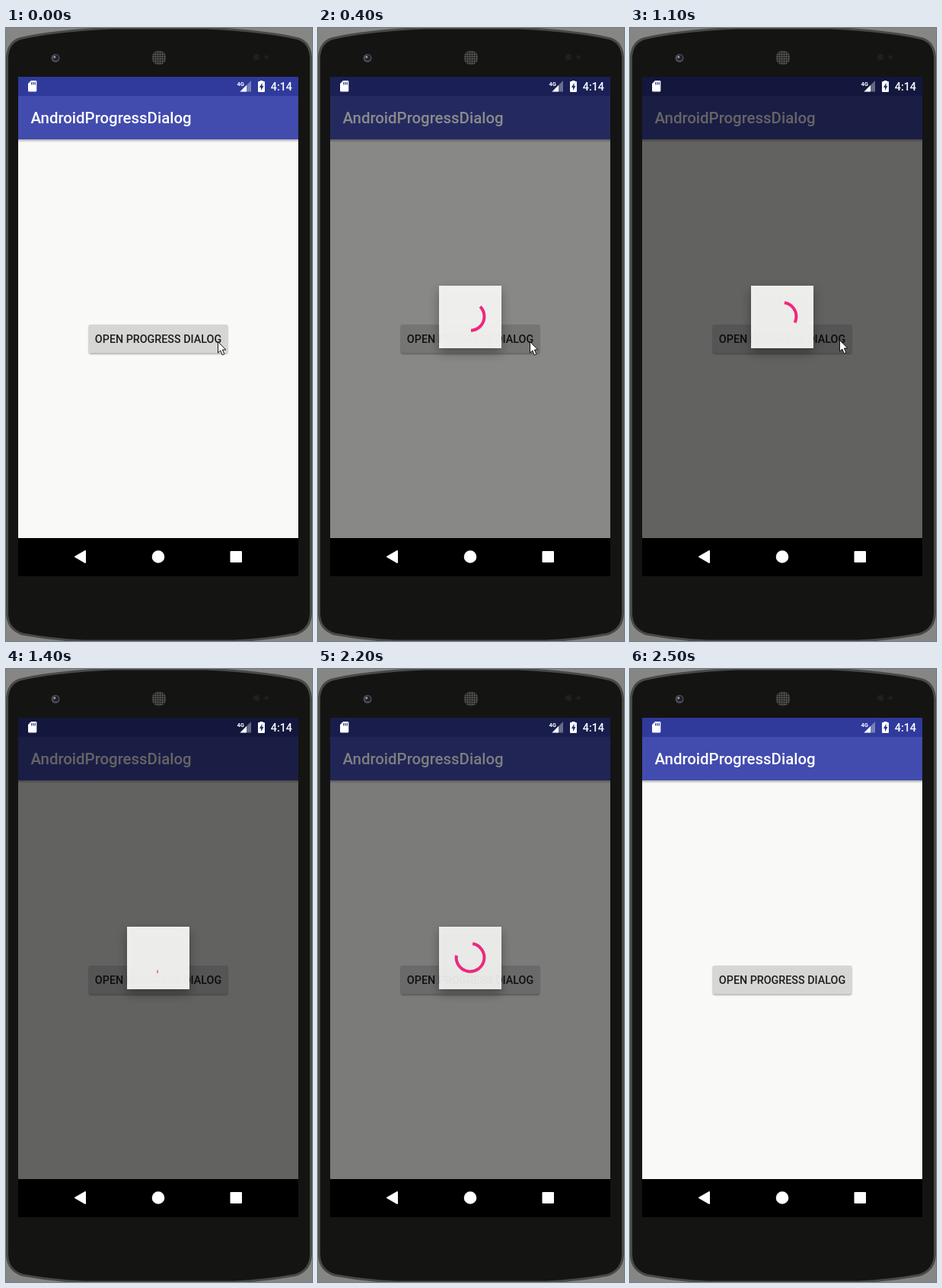
Write an HTML page that moves like this. It is 402 px wide and 804 px high and loops after 4000 ms.

```html
<!DOCTYPE html>
<html lang="en">
<head>
<meta charset="utf-8">
<title>Progress dialog</title>
<style>
  html, body { margin: 0; width: 100%; height: 100%; overflow: hidden; background: #868684; }
  svg { display: block; width: 402px; height: 804px; }
  text { font-family: Roboto, sans-serif; font-weight: 500; }
</style>
</head>
<body>
<svg viewBox="0 0 402 804">
  <defs>
    <pattern id="mesh" width="3" height="3" patternUnits="userSpaceOnUse">
      <circle cx="1.5" cy="1.5" r="1" fill="#686866"/>
    </pattern>
    <linearGradient id="barShadow" x2="0" y2="1">
      <stop stop-opacity=".3"/>
      <stop offset="1" stop-opacity="0"/>
    </linearGradient>
    <filter id="soft" x="-50%" y="-50%" width="200%" height="200%"><feGaussianBlur stdDeviation="7"/></filter>
    <filter id="thin" x="-5%" y="-20%" width="110%" height="140%"><feGaussianBlur stdDeviation=".9"/></filter>
  </defs>

  <!-- phone -->
  <path d="M1.5 60V38Q3 19 18 14Q60 4 140 0H262Q342 4 384 14Q399 19 400.5 38V768Q400 789 380 795Q342 802 300 804H102Q60 802 22 795Q2 789 1.5 768Z"
        fill="#141413" stroke="#484a48" stroke-width="3"/>
  <circle cx="65" cy="39.5" r="5.5" fill="#4a4b51"/>
  <circle cx="65.5" cy="39" r="3.6" fill="#20212c"/>
  <circle cx="63.8" cy="38" r="1.5" fill="#9da0b4"/>
  <circle cx="201" cy="39" r="9.5" fill="#252524"/>
  <circle cx="201" cy="39" r="9.5" fill="url(#mesh)"/>
  <circle cx="329" cy="38" r="4" fill="#20201f"/>
  <circle cx="342" cy="38" r="2.5" fill="#20201f"/>

  <!-- app -->
  <rect x="16" y="64" width="368" height="605" fill="#f9f9f7"/>
  <rect x="16" y="146" width="368" height="4" fill="url(#barShadow)"/>
  <rect x="16" y="64" width="368" height="25" fill="#303a9b"/>
  <rect x="16" y="89" width="368" height="57" fill="#424cae"/>
  <text x="32.5" y="125" font-size="20.4" fill="#fff">AndroidProgressDialog</text>
  <rect x="109" y="390.5" width="182" height="37" rx="2" opacity=".4" filter="url(#thin)"/>
  <rect x="108.5" y="389" width="183" height="37.5" rx="2" fill="#d6d7d5"/>
  <text x="200" y="413" font-size="14.3" text-anchor="middle" fill="#1d1d1c">OPEN PROGRESS DIALOG</text>
  <rect id="dim" x="16" y="64" width="368" height="605" opacity="0"/>

  <!-- status icons -->
  <g fill="#fff">
    <path d="M33 69H39Q40.3 69 40.3 70.3V82Q40.3 83.5 39 83.5H30.3Q29 83.5 29 82V73Z"/>
    <path d="M33.7 71V74.5M36 71V74.5M38.3 71V74.5" stroke="#303a9b" stroke-width="1.2"/>
    <text x="303.5" y="75.5" font-size="7.5" style="font-weight:700">4G</text>
    <path d="M322 69V83.5H307.5Z" opacity=".35"/>
    <path d="M316 75V83.5H307.5Z"/>
    <path d="M333.5 70V69H337.5V70H339Q340 70 340 71V83Q340 84 339 84H332Q331 84 331 83V71Q331 70 332 70Z"/>
    <path d="M336.5 72L333 78H335V82L338.5 76H336.5Z" fill="#252d7c"/>
    <text x="347.8" y="82" font-size="14.3">4:14</text>
  </g>

  <!-- navigation bar -->
  <rect x="16" y="669" width="368" height="50"/>
  <g fill="#fff" stroke="#fff" stroke-width="2" stroke-linejoin="round">
    <path d="M91 693.5L104 686V701Z"/>
    <circle cx="200" cy="693.5" r="7.3"/>
    <path d="M295.5 687H309V700H295.5Z"/>
  </g>

  <g id="dialog" opacity="0">
    <rect x="159" y="344" width="82" height="82" opacity=".32" filter="url(#soft)"/>
    <rect x="159" y="338" width="82" height="82" fill="#f6f6f4" opacity=".95"/>
    <circle id="arc" cx="200" cy="378.4" r="18.4" fill="none" stroke="#f0277d" stroke-width="4" pathLength="360"/>
  </g>
  <path id="cursor" d="M0 0V14.5L3.3 11.5L5.7 17.3L8.3 16.2L5.9 10.5H10.3Z" fill="#fff" stroke="#111"/>
</svg>
<script>
const LOOP = 4000, STEP = 100;
const OPEN = 250, CLOSED = 2300;      // dialog starts to appear, dialog is gone
const DIM = 0.605, DIM_FADE = 200, DIALOG_FADE = 150;
const RING_CYCLE = 1333, RING_TURN = 2222, RING_DELAY = 170, RING_PHASE = -35, MAX_SWEEP = 270;
const MOVE = 1100, LEAVE = 1200;      // pointer shifts, pointer leaves

const [dim, dialog, arc, cursor] =
  ['dim', 'dialog', 'arc', 'cursor'].map(id => document.getElementById(id));
const clamp = x => Math.min(1, Math.max(0, x));

// cubic-bezier(.4, 0, .2, 1)
function standardEase(x) {
  x = clamp(x);
  let low = 0, high = 1;
  for (let i = 0; i < 20; i++) {
    const s = (low + high) / 2, r = 1 - s;
    if (1.2 * r * r * s + 0.6 * r * s * s + s ** 3 < x) low = s; else high = s;
  }
  return low * low * (3 - 2 * low);
}

// The head runs ahead in the first half of a cycle, the tail follows in the second.
function drawRing(time) {
  const cycle = (time - RING_DELAY + RING_CYCLE) / RING_CYCLE % 1;
  const head = MAX_SWEEP * standardEase(cycle * 2);
  const tail = MAX_SWEEP * standardEase(cycle * 2 - 1);
  const turn = RING_PHASE + 360 * time / RING_TURN + 90 * cycle;
  arc.setAttribute('stroke-dasharray', `${head - tail} 360`);
  arc.setAttribute('transform', `rotate(${turn + tail - 90} 200 378.4)`);
}

function draw(time) {
  const shade = clamp(Math.min(time - OPEN, CLOSED + 67 - time) / DIM_FADE);
  const entered = 1 - (1 - clamp((time - OPEN) / DIALOG_FADE)) ** 3;
  const left = clamp(1 - (CLOSED - time) / DIALOG_FADE) ** 3;
  dim.setAttribute('opacity', DIM * shade);
  dialog.setAttribute('opacity', entered * (1 - left));
  drawRing(time);
  cursor.setAttribute('transform', time < MOVE ? 'translate(278.5 411.5)' : 'translate(275.5 409.5)');
  cursor.setAttribute('opacity', time < LEAVE ? 1 : 0);
}

const begin = performance.now();
function tick() {
  const time = (performance.now() - begin) % LOOP;
  draw(Math.floor(time / STEP) * STEP);
  requestAnimationFrame(tick);
}
tick();
</script>
</body>
</html>
```
